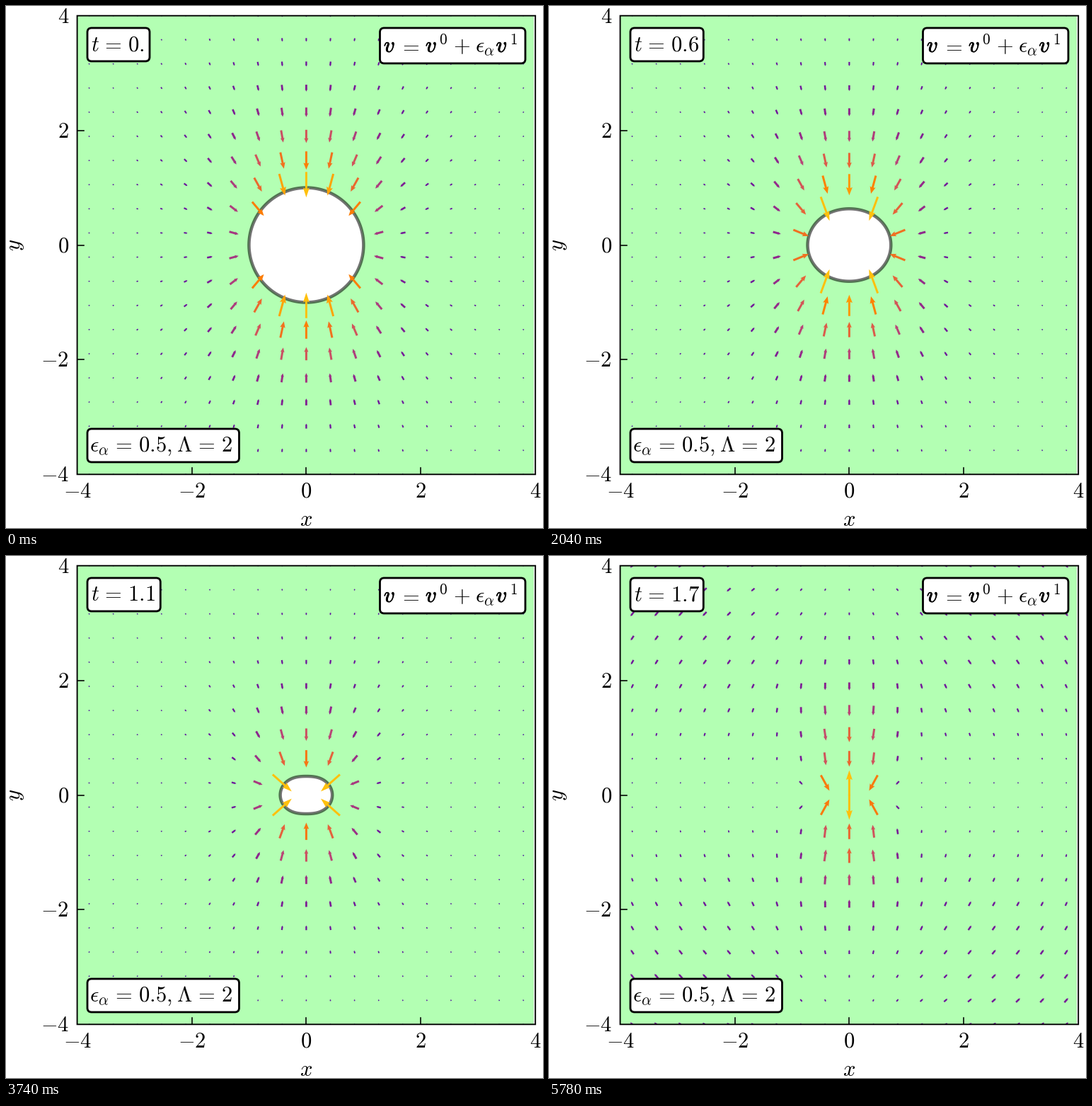
A matplotlib script for the animation above (5950 ms loop, 759 by 737 pixels).

```python
import numpy as np
import matplotlib.pyplot as plt
from matplotlib import patheffects
from matplotlib.animation import FuncAnimation
from matplotlib.collections import PolyCollection
from matplotlib.colors import LinearSegmentedColormap
from matplotlib.patches import FancyBboxPatch, Polygon, Rectangle

W, H, DPI = 759, 737, 128
PX = 72 / DPI                      # points per pixel
CX, CY, UNIT = 424.4, 337.5, 80.95
LEFT, TOP, SIDE = CX - 4 * UNIT, CY - 4 * UNIT, 8 * UNIT
FRAMES, INTERVAL, DT = 35, 170, 0.05
MAX_LEN = 36
EQ = r"\hspace{0.13}=\hspace{0.13}"   # equals sign with wider spacing

plt.rcParams["mathtext.fontset"] = "cm"
fig = plt.figure(figsize=(W / DPI, H / DPI), dpi=DPI, facecolor="white")
ax = fig.add_axes([0, 0, 1, 1])
ax.set(xlim=(0, W), ylim=(H, 0))
ax.axis("off")

cmap = LinearSegmentedColormap.from_list("speed", [
    (0.0, "#4a1ca0"), (0.1, "#64149f"), (0.2, "#70169a"), (0.33, "#942a8a"),
    (0.45, "#c04a72"), (0.58, "#e2603f"), (0.73, "#ff8000"), (1.0, "#ffc00c")])


def label(x, y, s, size=30.6, bold=False, **kw):
    kw = {"ha": "left", "va": "baseline", "zorder": 8, **kw}
    txt = ax.text(x, y, s, fontsize=size * PX, color="black", **kw)
    if bold:
        txt.set_path_effects([patheffects.withStroke(linewidth=0.9 * PX, foreground="black")])
    return txt


def box(x0, y0, x1, y1):
    patch = FancyBboxPatch((x0, y0), x1 - x0, y1 - y0,
                           boxstyle="round,pad=0,rounding_size=6", fc="white",
                           ec="black", lw=2.8 * PX, zorder=7)
    return ax.add_patch(patch)


def draw_axes():
    ax.add_patch(Rectangle((LEFT, TOP), SIDE - 2.5, SIDE, fc="#b3ffb3", lw=0, zorder=1))
    ax.add_patch(Rectangle((LEFT, TOP), SIDE, SIDE, fc="none", ec="black",
                           lw=1.9 * PX, snap=False, zorder=6))
    for v in range(-4, 5, 2):
        x, y = CX + v * UNIT, CY - v * UNIT
        if abs(v) < 4:
            ax.plot([x, x], [TOP + SIDE, TOP + SIDE - 9], "k", lw=1.6 * PX, zorder=6)
            ax.plot([LEFT, LEFT + 9], [y, y], "k", lw=1.6 * PX, zorder=6)
        label(x, 694, f"${v}$", ha="center")
        label(89, y + 10, f"${v}$", ha="right")
    label(CX, 734, "$x$", ha="center")
    label(13.5, CY, "$y$", ha="center", va="center", rotation=90)


def draw_formulas():
    box(528.5, 31, 734, 81)
    for x in (534, 593, 692.5):
        label(x, 65, "$v$", bold=True)
    label(612.5, 54, "$0$", 21.4)
    label(712, 54, "$1$", 21.4)
    label(570, 65, "$=$", ha="center")
    label(632, 65, "$+$")
    label(663, 65, r"$\epsilon_\alpha$")
    box(115, 597, 329.5, 644)
    label(118.5, 629, rf"$\epsilon_\alpha{EQ}0.5,\hspace{{0.05}}\Lambda{EQ}2$")


def hole_radius(t, theta):
    mean = 1 - 0.51 * t - 0.04 * t ** 2
    wobble = 0.104 * t - 0.042 * t ** 2
    return np.maximum(mean + wobble * np.cos(2 * theta), 0)


gx, gy = (g.ravel() for g in np.meshgrid(np.arange(-9, 10) * 8 / 19,
                                         np.linspace(-4, 4, 20)))
gr, gth = np.hypot(gx, gy), np.arctan2(gy, gx)


def polar(inward, swirl):
    """Inward flow plus a drift towards the x axis, as Cartesian parts."""
    c, s = gx / gr, gy / gr
    tang = -swirl * 2 * s * c
    return -inward * c - tang * s, -inward * s + tang * c


def field(t):
    s2 = (gy / gr) ** 2
    along_y = 80 * np.exp(-0.78 * gr)
    swirl = 7 / (gr ** 2 + 0.08)
    u, v = polar(along_y * s2 + 22 / (gr ** 2 + 0.08) * (1 - s2), swirl)

    # as the hole shuts, the flow narrows to a jet with a weak outer swirl
    k = np.clip((t - 1.5) / 0.2, 0, 1) ** 2
    jet = 0.62 * along_y * (1 - np.exp(-(gr / 0.55) ** 2)) * s2 ** 1.5
    pull = 44 * np.exp(-(gr / 0.6) ** 2) * (1 - s2)
    outer = 8 * (1 - np.exp(-(gr / 2.2) ** 2))
    lu, lv = polar(jet + pull, 0.75 * swirl + outer)
    u, v = u + k * (lu - u), v + k * (lv - v)

    core = gr < 0.3
    u[core] = 0
    v[core] = np.sign(gy[core]) * (10 + 26 * k)
    return u, v


def arrow_polys(t):
    u, v = field(t)
    keep = gr > hole_radius(t, gth)
    u, v, x, y = u[keep], v[keep], gx[keep], gy[keep]
    speed = np.hypot(u, v)
    rel = speed / speed.max()
    n = np.maximum(MAX_LEN * rel, 2)
    shaft = np.minimum(1.5, 0.6 + 0.085 * n)
    head = np.minimum(4.5, 0.65 + 0.13 * n)
    tip, neck, barb = n / 2, 0.16 * n, 0.12 * n
    along = np.stack([-tip, neck, barb, tip, barb, neck, -tip], axis=1)
    side = np.stack([shaft, shaft, head, 0 * n, -head, -shaft, -shaft], axis=1)
    c, s = (u / speed)[:, None], (-v / speed)[:, None]
    px = CX + UNIT * x[:, None] + along * c - side * s
    py = CY - UNIT * y[:, None] + along * s + side * c
    return np.stack([px, py], axis=2), cmap(rel)


draw_axes()
draw_formulas()
theta = np.linspace(0, 2 * np.pi, 240, endpoint=False)
hole = ax.add_patch(Polygon(np.zeros((3, 2)), closed=True, fc="white",
                            ec=(0, 0, 0, 0.55), lw=4.5 * PX, zorder=2))
arrows = ax.add_collection(PolyCollection([], linewidths=0, zorder=3), autolim=False)
arrows.set_clip_path(Rectangle((LEFT, TOP), SIDE, SIDE, transform=ax.transData))
clock_box = box(115, 31, 203, 78)
clock = label(119.5, 63, "")


def update(i):
    t = i * DT
    r = UNIT * hole_radius(t, theta)
    hole.set_xy(np.column_stack([CX + r * np.cos(theta), CY - r * np.sin(theta)]))
    hole.set_visible(t < 1.68)
    polys, colors = arrow_polys(t)
    arrows.set_verts(polys)
    arrows.set_facecolor(colors)
    digits = f"{t:.2f}".rstrip("0")
    clock.set_text(f"$t{EQ}{digits}$")
    clock_box.set_width(88 + 15.3 * (len(digits) - 2))
    return hole, arrows, clock_box, clock


anim = FuncAnimation(fig, update, frames=FRAMES, interval=INTERVAL,
                     init_func=lambda: update(0), repeat=True, repeat_delay=0)
plt.show()
```
